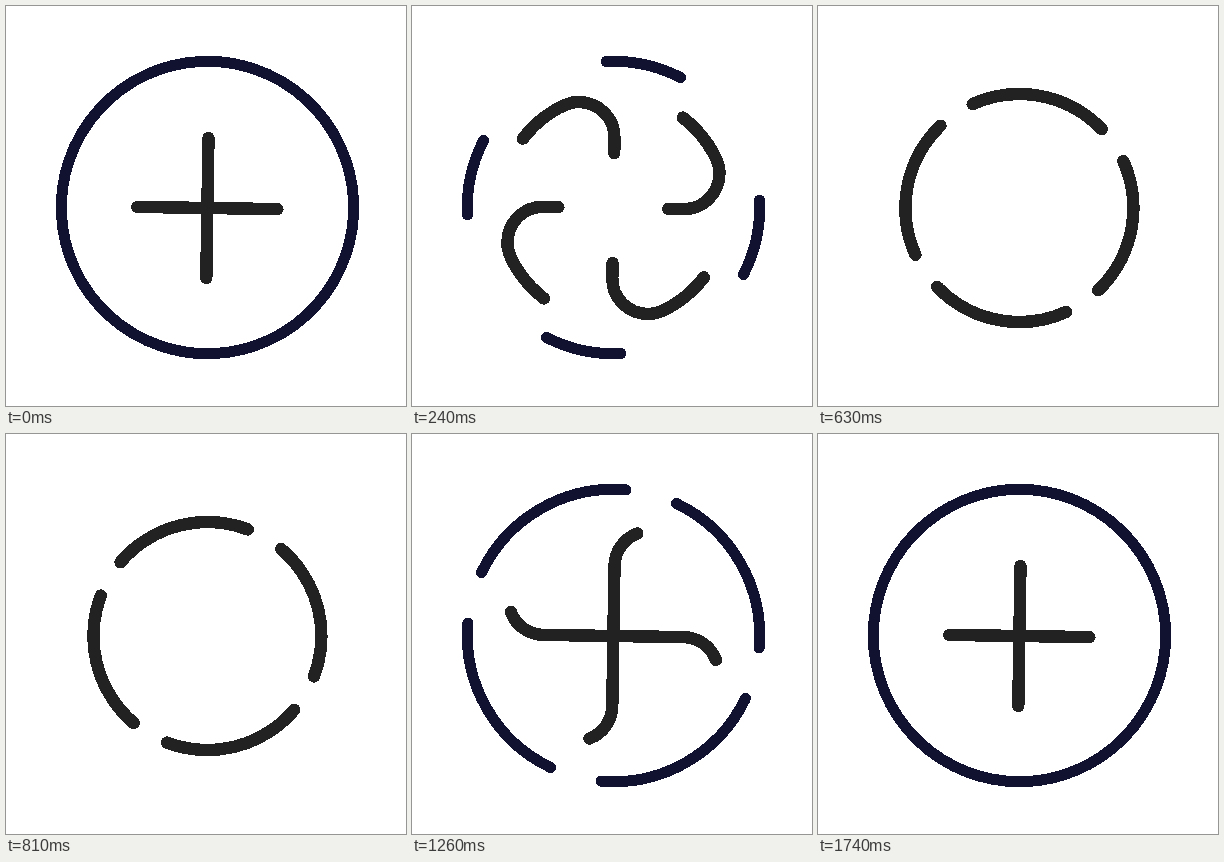
An HTML page for the animation above (3.86 s loop, 400 by 400 pixels).

```html
<!DOCTYPE html>
<html lang="en">
<head>
<meta charset="utf-8">
<title>Plus and ring</title>
<style>
  html, body { margin: 0; width: 100%; height: 100%; overflow: hidden; background: #fff; }
  svg { display: block; width: 100%; height: 100%; shape-rendering: crispEdges; }
  path { fill: none; stroke-linecap: round; }
  #ring { stroke: #111130; stroke-width: 11; }
  #arm { stroke: #222; stroke-width: 12.4; stroke-dasharray: 140 4000; }
</style>
</head>
<body>
<svg viewBox="0 0 400 400">
  <defs>
    <path id="ring"/>
    <!-- up the bar, out to the circle, one and a half turns, back into the bar -->
    <path id="arm" d="M0 70V-70C0 -90 -16 -105.5 -36.5 -105.5C-47 -105.5 -57 -99.3 -65.4 -93.4
      A114 114 0 0 0 -65.4 93.4A114 114 0 1 0 -65.4 -93.4A114 114 0 0 0 -65.4 93.4
      C-57 99.3 -47 105.5 -36.5 105.5C-16 105.5 0 90 0 70V-70"/>
  </defs>
  <g id="rings" transform="translate(201.5 201.5)"></g>
  <g id="arms" transform="translate(201.4 202) rotate(.9)"></g>
</svg>
<script>
const LOOP = 3860, STEP = 30, MOVE_END = 1740;
const RADIUS = 146.2, PX_PER_DEGREE = 2.09;
const times = [0, 240, 480, 810, 1050, 1260, 1500, 1740];
const travel = [0, 125, 413, 835, 1110, 1209, 1242, 1252];
const last = times.length - 1;

const byId = id => document.getElementById(id);
const ring = byId('ring'), arm = byId('arm');

for (const name of ['ring', 'arm']) {
  byId(name + 's').innerHTML = [0, 90, 180, 270]
    .map(angle => `<use href="#${name}" transform="rotate(${angle})"/>`).join('');
}

function slope(i) {
  if (i === 0 || i === last) return 0;
  return (travel[i + 1] - travel[i - 1]) / (times[i + 1] - times[i - 1]);
}

// Smooth cubic through the distance keys.
function distanceAt(t) {
  if (t >= MOVE_END) return travel[last];
  const i = times.findIndex(time => time > t) - 1;
  const span = times[i + 1] - times[i];
  const u = (t - times[i]) / span, v = 1 - u;
  return travel[i] * v * v * (1 + 2 * u) + travel[i + 1] * u * u * (3 - 2 * u)
    + span * u * v * (slope(i) * v - slope(i + 1) * u);
}

function point(degrees) {
  const a = degrees * Math.PI / 180;
  return `${RADIUS * Math.cos(a)} ${RADIUS * Math.sin(a)}`;
}

function arc(from, to) {
  return to > from ? `M${point(from)}A${RADIUS} ${RADIUS} 0 0 1 ${point(to)}` : '';
}

function draw(t) {
  const s = distanceAt(t);
  arm.style.strokeDashoffset = -s;
  const left = 90 - s / PX_PER_DEGREE;
  const grown = 90 - (travel[last] - s) / PX_PER_DEGREE;
  ring.setAttribute('d', left > 0 ? arc(-92.9, -92.9 + left) : arc(-85.1 - grown, -85.1));
}

const start = performance.now();
function tick() {
  const t = (performance.now() - start) % LOOP;
  draw(Math.min(Math.floor(t / STEP) * STEP, MOVE_END));
  requestAnimationFrame(tick);
}
tick();
</script>
</body>
</html>
```
